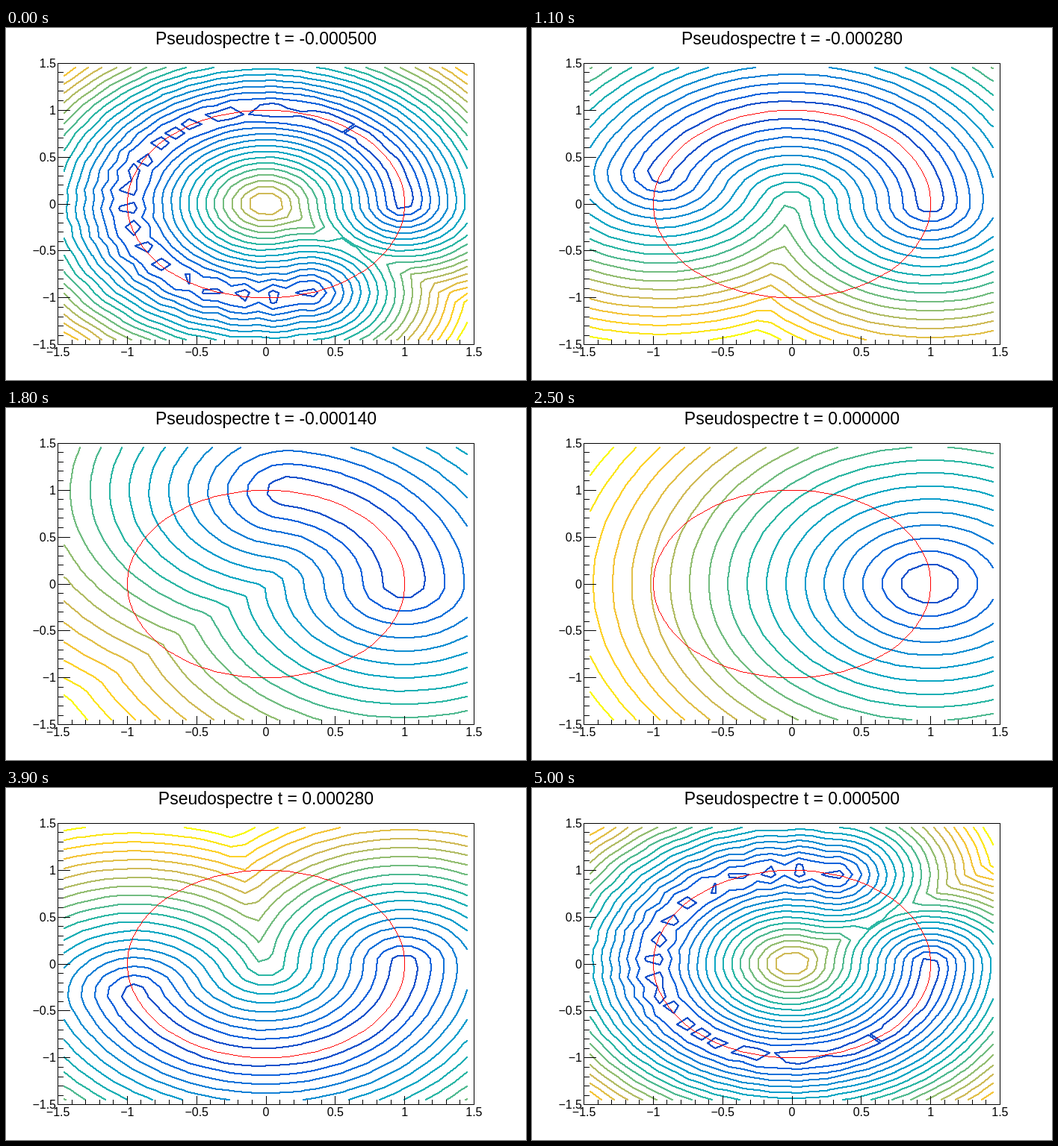
An HTML page with a canvas for the animation above (5100 ms loop, 696 by 472 pixels).

```html
<!DOCTYPE html>
<html lang="fr">
<head>
<meta charset="utf-8">
<title>Pseudospectre</title>
<style>
  html, body { margin: 0; width: 100%; height: 100%; overflow: hidden; background: #fff; }
  canvas, svg { position: absolute; left: 0; top: 0; width: 696px; height: 472px; }
  text { font: 16px "Liberation Sans", Arial, sans-serif; fill: #000; }
  #title { font-size: 23px; }
  .mid { text-anchor: middle; }
  .end { text-anchor: end; }
</style>
</head>
<body>
<canvas id="plot" width="696" height="472"></canvas>
<svg id="labels" viewBox="0 0 696 472">
  <text id="title" class="mid" x="348" y="22"></text>
</svg>
<script>
const STEPS = 51, STEP_MS = 100, DT = 0.00002;
const GRID = 30, LEVELS = 20, MODES = 40, RADIUS = 0.997;
const ctx = document.getElementById('plot').getContext('2d');
const svg = document.getElementById('labels');
const title = document.getElementById('title');

const px = x => Math.floor(348 + x * 185.6);
const py = y => Math.floor(236 - y * 125.867);
const center = i => -1.45 + i * 0.1;

// Colour palette: nine evenly spaced stops per channel
const R = [0.2082, 0.0592, 0.0780, 0.0232, 0.1802, 0.5301, 0.8186, 0.9956, 0.9764];
const G = [0.1664, 0.3599, 0.5041, 0.6419, 0.7178, 0.7492, 0.7328, 0.7862, 0.9832];
const B = [0.5293, 0.8684, 0.8385, 0.7914, 0.6425, 0.4662, 0.3499, 0.1968, 0.0539];

function levelColor(n) {
  const s = Math.floor((n + 0.99) * 255 / LEVELS) / 255 * 8;
  const i = Math.min(7, Math.floor(s)), f = s - i;
  const mix = c => Math.round(255 * (c[i] + (c[i + 1] - c[i]) * f));
  return `rgb(${mix(R)},${mix(G)},${mix(B)})`;
}
const colors = Array.from({ length: LEVELS }, (_, n) => levelColor(n));

// Hard-edged line, stamped with a square brush on whole pixels
function line(x0, y0, x1, y1, size) {
  const dx = x1 - x0, dy = y1 - y0;
  const n = Math.max(Math.abs(dx), Math.abs(dy), 1);
  const shift = size >> 1;
  for (let i = 0; i <= n; i++) {
    const x = Math.round(x0 + dx * i / n), y = Math.round(y0 + dy * i / n);
    ctx.fillRect(x - shift, y - shift, size, size);
  }
}

// Distance from each grid point to the nearest eigenvalue, argument -2*pi*n^2*t
function field(t) {
  const points = [];
  for (let n = 0; n <= MODES; n++) {
    const a = -2 * Math.PI * n * n * t;
    points.push([RADIUS * Math.cos(a), RADIUS * Math.sin(a)]);
  }
  const z = [];
  for (let j = 0; j < GRID; j++) {
    for (let i = 0; i < GRID; i++) {
      let d = Infinity;
      for (const [x, y] of points) d = Math.min(d, Math.hypot(center(i) - x, center(j) - y));
      z.push(d);
    }
  }
  return z;
}

// Contours of one cell; ambiguous cells keep their low corners apart
function cell(corners, min, step) {
  const values = corners.map(c => c[2]);
  const first = Math.max(1, Math.floor((Math.min(...values) - min) / step));
  const last = Math.min(LEVELS - 1, Math.ceil((Math.max(...values) - min) / step));
  for (let n = first; n <= last; n++) {
    const level = min + n * step, hits = [];
    corners.forEach((a, k) => {
      const b = corners[(k + 1) % 4];
      const up = a[2] < level && b[2] >= level;
      if (!up && !(a[2] >= level && b[2] < level)) return;
      const f = (level - a[2]) / (b[2] - a[2]);
      hits.push({ up, x: px(a[0] + (b[0] - a[0]) * f), y: py(a[1] + (b[1] - a[1]) * f) });
    });
    ctx.fillStyle = colors[n];
    hits.forEach((h, k) => {
      if (!h.up) return;
      const g = hits[(k + hits.length - 1) % hits.length];
      line(g.x, g.y, h.x, h.y, 2);
    });
  }
}

function contours(t) {
  const z = field(t);
  const min = Math.min(...z), step = (Math.max(...z) - min) / LEVELS;
  const corner = (i, j) => [center(i), center(j), z[j * GRID + i]];
  for (let j = 0; j < GRID - 1; j++) {
    for (let i = 0; i < GRID - 1; i++) {
      cell([corner(i, j), corner(i + 1, j), corner(i + 1, j + 1), corner(i, j + 1)], min, step);
    }
  }
}

function circle() {
  ctx.fillStyle = '#f00';
  const at = k => Math.PI * k / 100;
  for (let k = 0; k < 200; k++) {
    const a = at(k), b = at(k + 1);
    line(px(Math.cos(a)), py(Math.sin(a)), px(Math.cos(b)), py(Math.sin(b)), 1);
  }
}

function axes() {
  ctx.fillStyle = '#000';
  ctx.fillRect(69, 47, 558, 1);
  ctx.fillRect(69, 424, 558, 1);
  ctx.fillRect(69, 47, 1, 378);
  ctx.fillRect(626, 47, 1, 378);
  for (let k = -15; k <= 15; k++) {
    const major = k % 5 === 0, h = major ? 11 : 6;
    ctx.fillRect(px(k / 10), 424 - h, 1, h);
    ctx.fillRect(69, py(k / 10), major ? 17 : 8, 1);
  }
}

function label(text, x, y, cls) {
  const el = document.createElementNS(svg.namespaceURI, 'text');
  el.setAttribute('x', x);
  el.setAttribute('y', y);
  el.setAttribute('class', cls);
  el.textContent = text;
  svg.append(el);
}

for (let k = -3; k <= 3; k++) {
  const v = k / 2, text = String(v).replace('-', '\u2212');
  label(text, 348 + v * 185.6, 440, 'mid');
  label(text, 67, py(v) + 6, 'end');
}

function draw(k) {
  const t = (k - 25) * DT;
  ctx.fillStyle = '#fff';
  ctx.fillRect(0, 0, 696, 472);
  contours(t);
  circle();
  axes();
  title.textContent = 'Pseudospectre t = ' + t.toFixed(6);
}

const start = performance.now();
let shown = -1;
function tick() {
  const k = Math.floor((performance.now() - start) / STEP_MS) % STEPS;
  if (k !== shown) draw(shown = k);
  requestAnimationFrame(tick);
}
tick();
</script>
</body>
</html>
```
